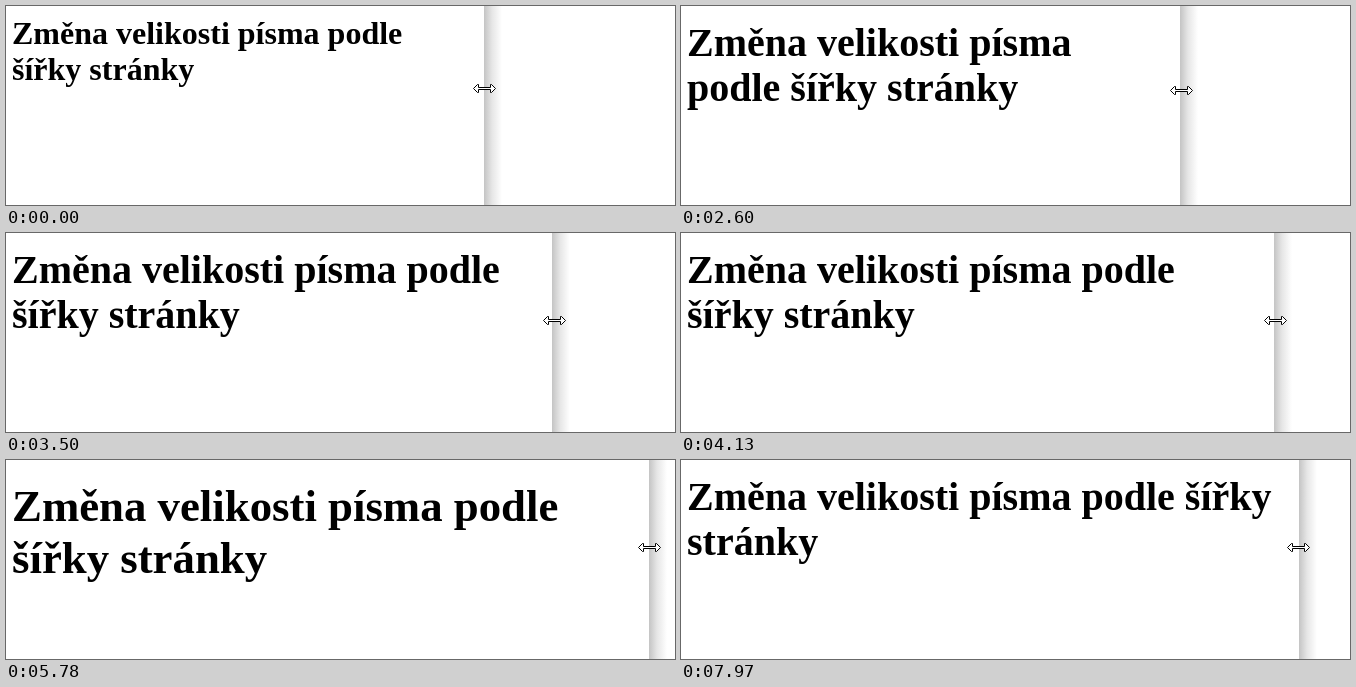
These frames come from a looping animation (669x199 px, 8000 ms). An HTML page:

```html
<!DOCTYPE html>
<html lang="cs">
<head>
<meta charset="utf-8">
<title>Změna velikosti písma</title>
<style>
html, body { margin: 0; width: 100%; height: 100%; overflow: hidden; background: #fff; }
#stage { position: relative; width: 669px; height: 199px; overflow: hidden; }
h1 { position: absolute; left: 6px; margin: 0; color: #000;
  font-family: "Liberation Serif", "Times New Roman", serif; font-weight: bold; }
#shadow { position: absolute; top: 0; width: 18px; height: 199px;
  background: linear-gradient(90deg, #c4c4c4, #e6e6e6 45%, #fff); }
#cursor { position: absolute; left: -12px; top: -6px; }
</style>
</head>
<body>
<div id="stage">
  <h1>Změna velikosti písma podle šířky stránky</h1>
  <div id="shadow"></div>
  <svg id="cursor" width="24" height="12" viewBox="-12 -6 24 12">
    <path d="M-11 0L-7 -4H-6V-1H6V-4H7L11 0L7 4H6V1H-6V4H-7Z" fill="#fff" stroke="#000"/>
  </svg>
</div>
<script>
const LOOP = 8000, STEP = 30, PHASE = 20, LAG = 20, START = 478.5;

// Each drag moves the page edge by dist, easing out with the given power
const drags = [
  { from: 1370, to: 1730, dist: 11, power: 1 },
  { from: 2390, to: 3200, dist: 37, power: 1.2 },
  { from: 3200, to: 4130, dist: 68, power: 1 },
  { from: 4130, to: 5750, dist: 49, power: 1.5 },
  { from: 7490, to: 7970, dist: -26, power: 1 }
];

const breakpoints = [
  { edge: 638, size: 44.8, line: 52, top: 20 },
  { edge: 480, size: 40, line: 45, top: 14 },
  { edge: 0, size: 32, line: 36, top: 9 }
];

const title = document.querySelector("h1").style;
const shadow = document.getElementById("shadow").style;
const cursor = document.getElementById("cursor").style;

const clamp = u => Math.min(1, Math.max(0, u));
const snap = v => Math.floor(v) + 0.5;

function pointerX(t) {
  return snap(drags.reduce((x, d) => {
    const u = clamp((t - d.from) / (d.to - d.from));
    return x + d.dist * (1 - (1 - u) ** d.power);
  }, START));
}

function draw(now) {
  const t = Math.floor((now % LOOP - PHASE) / STEP) * STEP + PHASE;
  const x = pointerX(t);
  const y = snap(82.5 + 5 * clamp((x - START) / 50));
  const edge = pointerX(t - LAG) - 0.5;
  const { size, line, top } = breakpoints.find(b => edge >= b.edge);
  title.fontSize = size + "px";
  title.lineHeight = line + "px";
  title.top = top + "px";
  title.width = edge - 14 + "px";
  shadow.left = edge + "px";
  cursor.transform = `translate(${x}px, ${y}px)`;
  requestAnimationFrame(draw);
}
requestAnimationFrame(draw);
</script>
</body>
</html>
```
